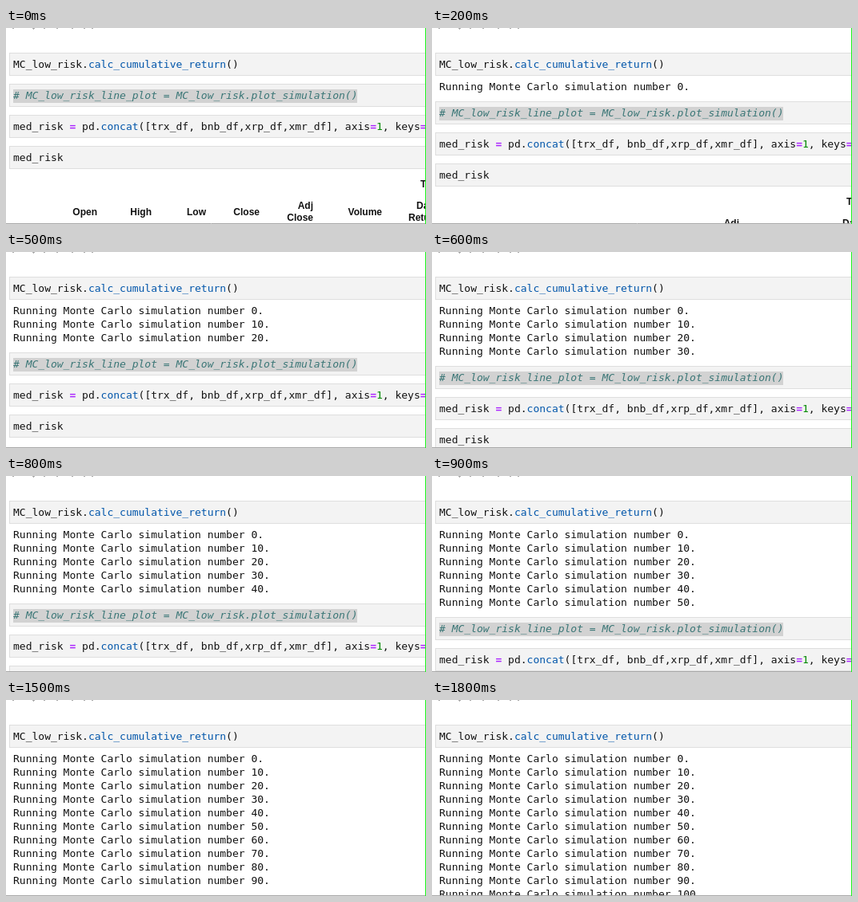
Write an HTML page that moves like this. It is 525 by 246 pixels and loops after 6400 ms.

```html
<!DOCTYPE html>
<html lang="en">
<head>
<meta charset="utf-8">
<title>Notebook run</title>
<style>
  html, body { margin: 0; width: 100%; height: 100%; overflow: hidden; background: #fff; }
  svg { display: block; width: 525px; height: 246px; }
  text { white-space: pre; font: 13px "DejaVu Sans Mono", monospace; fill: #111; }
  .head { font: bold 12px "Liberation Sans", Arial, sans-serif; }
  .call { fill: #0055aa; }
  .op { fill: #aa22ff; font-weight: bold; }
  .num { fill: #008800; }
  .note { fill: #3a7676; font-style: italic; }
  .cell { fill: #f3f3f3; stroke: #dedede; }
</style>
</head>
<body>
<svg viewBox="0 0 525 246">
  <path d="M8 .5h2M33 .5h3M34 1.5h1M47 .5h2M63 .5h2M82 .5h2M97 .5h2M107 .5h2" stroke="#aaa"/>
  <g id="top"></g>
  <g id="output"></g>
  <g id="below"></g>
  <path d="M0 245.5H525" stroke="#a8a8a8"/>
  <path d="M524.5 0V246" stroke="#1cf51c"/>
</svg>
<script>
const LOOP = 6400, LINE = 17;
// [start in ms, printed lines]
const STEPS = [[0, 0], [200, 1], [300, 2], [500, 3], [600, 4], [800, 5],
  [900, 6], [1200, 8], [1500, 10], [1800, 12]];
const [top_, output, below] = ['top', 'output', 'below'].map(id => document.getElementById(id));

function add(parent, tag, attrs, content = '') {
  const node = document.createElementNS('http://www.w3.org/2000/svg', tag);
  for (const key in attrs) node.setAttribute(key, attrs[key]);
  // Spans as [class|text]
  content.split(/(\{\w+\|[^}]*\})/).forEach(part => {
    const span = part.match(/^\{(\w+)\|(.*)\}$/);
    if (span) add(node, 'tspan', { class: span[1] }, span[2]);
    else if (part) node.append(part);
  });
  parent.append(node);
  return node;
}

function cell(parent, y, code, selected = 0) {
  add(parent, 'rect', { class: 'cell', x: 4.5, y: y + 0.5, width: 530, height: 28 });
  if (selected) add(parent, 'rect', { x: 9, y: y + 7, width: selected, height: 17, fill: '#d2d2d2' });
  add(parent, 'text', { x: 9, y: y + 19 }, code);
}

function heading(label, x, y, anchor = 'end') {
  add(below, 'text', { class: 'head', x, y, 'text-anchor': anchor }, label);
}

cell(top_, 31, 'MC_low_risk.{call|calc_cumulative_return}()');
cell(below, 70, '{note|# MC_low_risk_line_plot = MC_low_risk.plot_simulation()}', 430);
cell(below, 109, 'med_risk {op|=} pd.{call|concat}([trx_df, bnb_df,xrp_df,xmr_df], axis{op|=}{num|1}, keys{op|=}');
cell(below, 148, 'med_risk');

[['Open', 114], ['High', 182], ['Low', 250], ['Close', 317], ['Volume', 470]]
  .forEach(([label, x]) => heading(label, x, 235));
heading('Adj', 384, 227);
heading('Close', 384, 242);
heading('TRX', 518, 200, 'start');
heading('Daily', 513, 227, 'start');
heading('Return', 503, 242, 'start');

const lines = Array.from({ length: 12 }, (_, i) =>
  add(output, 'text', { x: 9, y: 78 + i * LINE }, `Running Monte Carlo simulation number ${i * 10}.`));

function draw() {
  const time = performance.now() % LOOP;
  const count = STEPS.filter(([start]) => start <= time).pop()[1];
  lines.forEach((line, i) => line.setAttribute('visibility', i < count ? 'visible' : 'hidden'));
  below.setAttribute('transform', `translate(0 ${count ? 5 + count * LINE : 0})`);
  requestAnimationFrame(draw);
}
draw();
</script>
</body>
</html>
```
